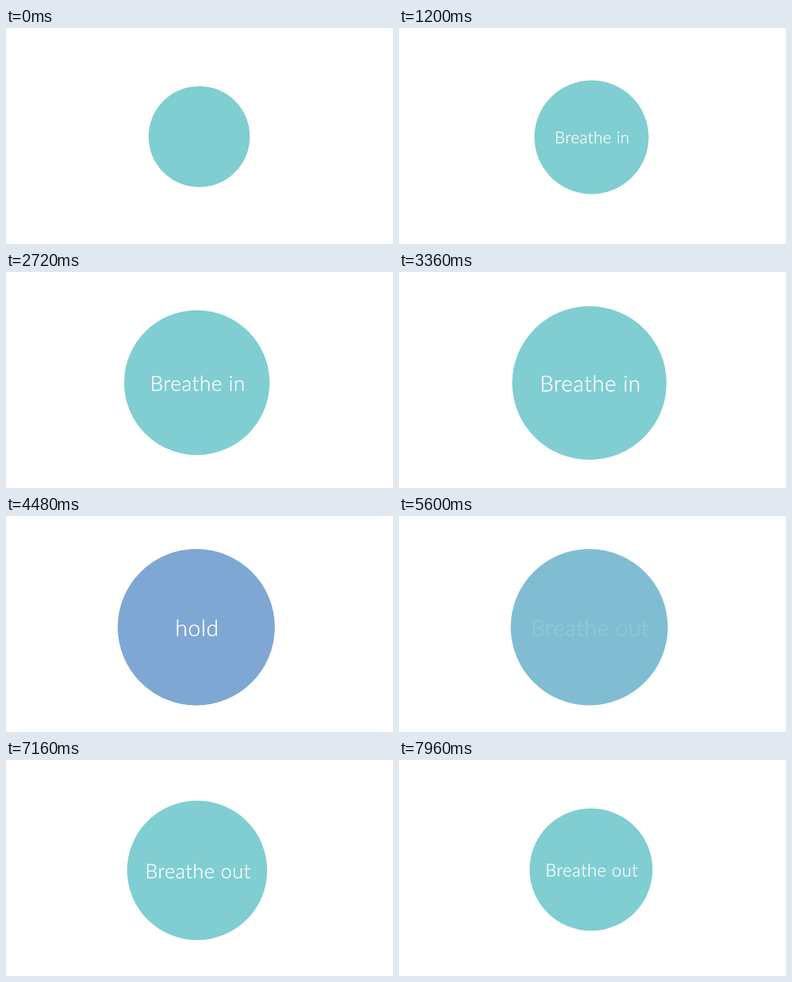
Animation of 642x360 px, one loop 8 s. Source, as an HTML page:

```html
<!DOCTYPE html>
<html lang="en">
<head>
<meta charset="utf-8">
<title>Breathing circle</title>
<style>
  html, body { margin: 0; width: 100%; height: 100%; overflow: hidden; background: #fff; }
  svg { display: block; width: 642px; height: 360px; }
  text {
    font: 300 28.5px Lato, "Open Sans", sans-serif;
    letter-spacing: .02em;
    text-anchor: middle;
    text-rendering: geometricPrecision;
    fill: #fff;
    stroke: #fff;
    stroke-width: .35px;
  }
</style>
</head>
<body>
<svg viewBox="0 0 642 360">
  <g id="ball">
    <circle r="100" fill="#80ced2"/>
    <circle id="blue" r="100" fill="#7fa7d3" opacity="0"/>
    <text id="inhale" x="1.2" y="11.1" opacity="0">Breathe in</text>
    <text id="hold" x="1.2" y="11.1" opacity="0">hold</text>
    <text id="exhale" x="1.2" y="11.1" opacity="0">Breathe out</text>
  </g>
</svg>
<script>
  const LOOP = 8000, STEP = 40, BREATH = 4000;
  const SMALL = { r: 84, x: 320.5, y: 181 };
  const LARGE = { r: 130.2, x: 315.6, y: 185.2 };
  const $ = id => document.getElementById(id);
  const [ball, blue, inhale, hold, exhale] =
    ['ball', 'blue', 'inhale', 'hold', 'exhale'].map($);

  const ramp = (t, from, to) => Math.min(1, Math.max(0, (t - from) / (to - from)));
  const sine = p => (1 - Math.cos(Math.PI * p)) / 2;
  const breath = (t, start) => sine(ramp(t, start, start + BREATH));
  const fade = (el, value) => el.setAttribute('opacity', value.toFixed(3));

  function draw(t) {
    const size = breath(t, -80) - breath(t, 5675);
    const mix = key => SMALL[key] + (LARGE[key] - SMALL[key]) * size;
    ball.setAttribute('transform',
      `translate(${mix('x')} ${mix('y')}) scale(${mix('r') / 100})`);

    // Each label leaves before the next one appears.
    fade(blue, ramp(t, 3920, 4480) - ramp(t, 5280, 5840));
    fade(inhale, ramp(t, 0, 520) - ramp(t, 3920, 4200));
    fade(hold, ramp(t, 4200, 4480) - ramp(t, 5280, 5560));
    fade(exhale, ramp(t, 5560, 5840));
  }

  const start = performance.now();
  function tick() {
    const t = (performance.now() - start) % LOOP;
    draw(Math.floor(t / STEP) * STEP);
    requestAnimationFrame(tick);
  }
  tick();
</script>
</body>
</html>
```
